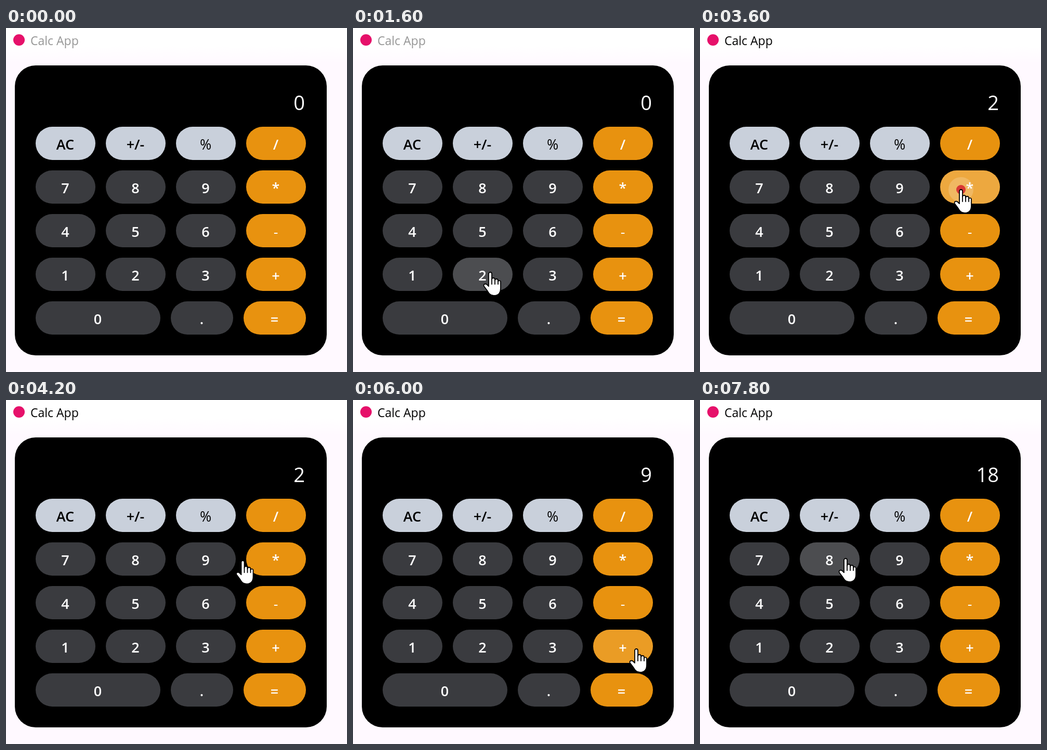
Write an HTML page that moves like this. It is 656x662 px and loops after 8 s.

```html
<!DOCTYPE html>
<html>
<head>
<meta charset="utf-8">
<style>
  html, body { margin: 0; width: 100%; height: 100%; overflow: hidden; background: #fff9ff; }
  svg { display: block; width: 656px; height: 662px; }
  text { font-family: "Open Sans", "Noto Sans", sans-serif; }
  .key { font-size: 27px; font-weight: 600; text-anchor: middle; }
  .thin { font-weight: 400; }
</style>
</head>
<body>
<svg viewBox="0 0 656 662">
  <defs>
    <linearGradient id="bar" x2="0" y2="1">
      <stop offset=".5" stop-color="#fff"/>
      <stop offset="1" stop-color="#fff9ff"/>
    </linearGradient>
  </defs>
  <rect width="656" height="68" fill="url(#bar)"/>
  <circle cx="25" cy="23" r="11" fill="#e6116a"/>
  <text id="title" x="47" y="33" font-size="23">Calc App</text>
  <rect x="17" y="72" width="600" height="558" rx="40"/>
  <text id="display" x="575" y="158" font-size="38" fill="#fff" text-anchor="end"></text>
  <g id="keys"></g>
  <circle id="ripple" r="24" fill="#fff" opacity=".18"/>
  <circle id="dot"/>
  <g id="hand" stroke="#000" stroke-width="1.8" stroke-linejoin="round" stroke-linecap="round">
    <path fill="#fff" d="M-3 27V3a3 3 0 0 1 6 0V14a3 3 0 0 1 6 0V16a3 3 0 0 1 6 0V18a2.6 2.6 0 0 1 5 0V31C20 40 15 45 7 45C0 45 -3 40 -6 35L-12 27C-14 23 -9 21 -6 24Z"/>
    <path fill="none" d="M3 14v9M9 15v8M15 17v6"/>
  </g>
</svg>
<script>
const LOOP = 8000, STEP = 200;
const $ = id => document.getElementById(id);
const GREY = '#3a3b3f', ORANGE = '#e8920f', LIGHT = '#c9d0db';

function add(tag, attrs, label = '') {
  const el = document.createElementNS('http://www.w3.org/2000/svg', tag);
  for (const k in attrs) el.setAttribute(k, attrs[k]);
  el.textContent = label;
  return $('keys').appendChild(el);
}

const rows = ['AC +/- % /', '7 8 9 *', '4 5 6 -', '1 2 3 +', '0 . ='];
const keys = rows.flatMap((row, r) => row.split(' ').map((label, c) => {
  const last = r === 4;
  const x = last ? [57, 317, 457][c] : 57 + 135 * c;
  const width = last ? (c ? 120 : 240) : 115;
  const y = 190 + 84 * r;
  const light = r === 0 && c < 3;
  const fill = light ? LIGHT : '/*-+='.includes(label) ? ORANGE : GREY;
  const box = { x, y, width, height: 64, rx: 32 };
  add('rect', { ...box, fill });
  const glow = add('rect', { ...box, fill: '#fff', opacity: 0 });
  add('text', {
    x: x + width / 2 - .5,
    y: y + ('+='.includes(label) ? 45 : 44),
    fill: light ? '#000' : '#fff',
    class: '%-'.includes(label) ? 'key thin' : 'key'
  }, label);
  return { ...box, glow };
}));

// pointer path: time, x, y
const path = [
  [800, 540, 300], [1200, 520, 481], [1600, 264, 470], [2400, 264, 470],
  [3000, 504, 313], [3200, 502, 311], [4000, 502, 311], [4400, 409, 307],
  [5200, 409, 307], [5800, 543, 476], [6000, 545, 479], [7000, 545, 479],
  [7600, 300, 315], [7800, 280, 305], [8000, 280, 305]
];
const clicks = [2000, 3600, 4800, 6200];
const values = [[6400, '18'], [5000, '9'], [2200, '2'], [0, '0']];

function pointer(t) {
  const i = path.findIndex(p => p[0] > t);
  const [t0, x0, y0] = path[i - 1], [t1, x1, y1] = path[i];
  const k = (t - t0) / (t1 - t0);
  return [x0 + (x1 - x0) * k, y0 + (y1 - y0) * k];
}

function set(id, attrs) {
  for (const k in attrs) $(id).setAttribute(k, attrs[k]);
}

function draw(t) {
  const visible = t >= path[0][0];
  const [x, y] = visible ? pointer(t) : [-100, -100];
  const click = clicks.findLast(c => c <= t);
  const age = click === undefined ? LOOP : t - click;
  const glow = [.2, .3, .18][age / STEP] ?? .09;

  for (const k of keys) {
    const over = x >= k.x && x <= k.x + k.width && y >= k.y && y <= k.y + k.height;
    k.glow.setAttribute('opacity', over ? glow : 0);
  }
  set('title', { fill: t < 2000 ? '#969696' : '#000' });
  $('display').textContent = values.find(v => v[0] <= t)[1];
  set('hand', { transform: `translate(${x} ${y})`, visibility: visible ? 'visible' : 'hidden' });
  set('ripple', { cx: x, cy: y, visibility: age === 0 ? 'visible' : 'hidden' });
  set('dot', {
    cx: x, cy: y - (age ? 2 : 0),
    r: age ? 22 : 9,
    fill: age ? '#a04050' : '#d93a35',
    opacity: age ? .4 : 1,
    visibility: age <= STEP ? 'visible' : 'hidden'
  });
}

function tick() {
  draw(Math.floor(performance.now() % LOOP / STEP) * STEP);
  requestAnimationFrame(tick);
}
tick();
</script>
</body>
</html>
```
